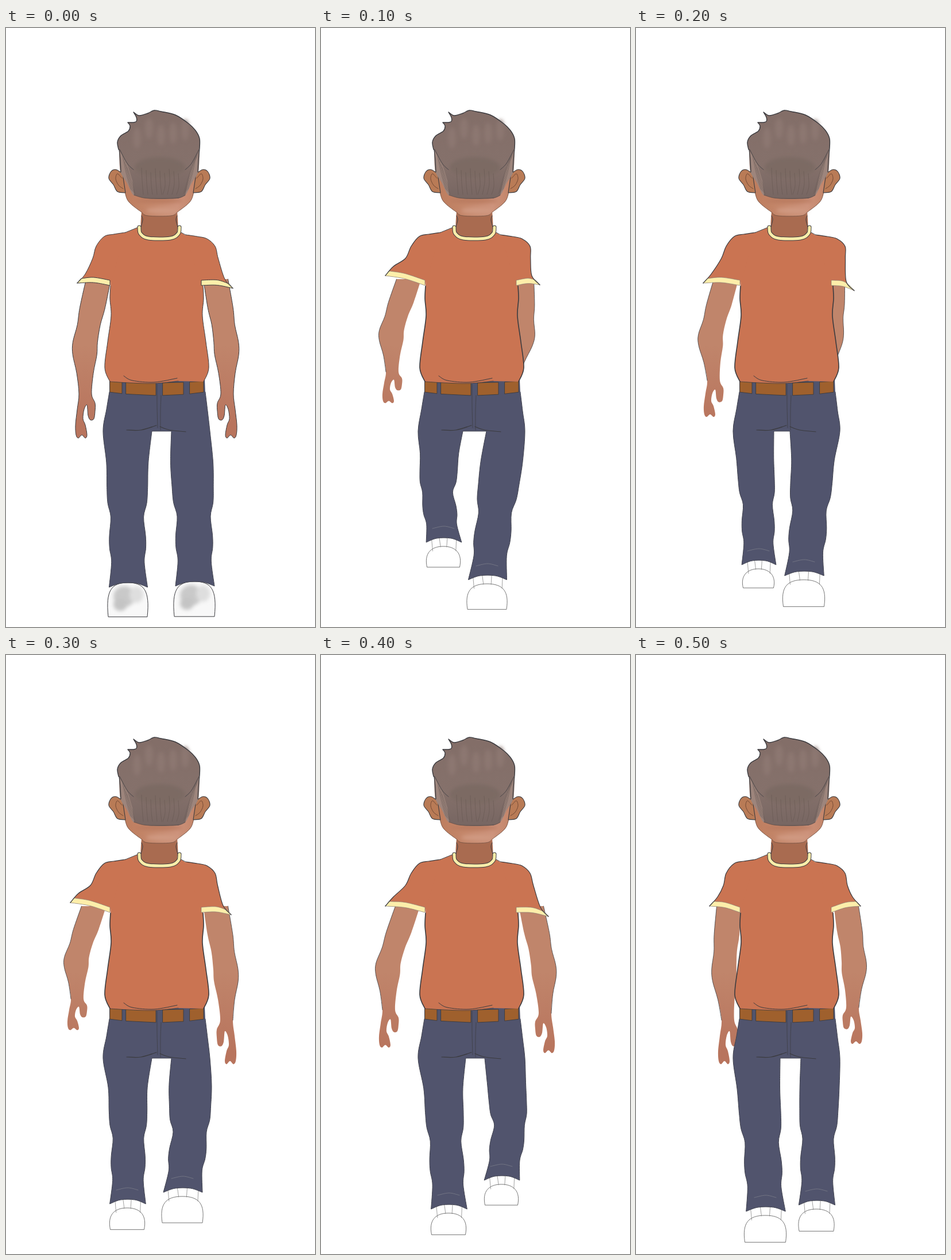
An HTML page for the animation above (0.6 s loop, 538 by 1040 pixels).

```html
<!DOCTYPE html>
<html lang="en">
<head>
<meta charset="utf-8">
<title>Walk cycle</title>
<style>
html, body { margin: 0; width: 100%; height: 100%; overflow: hidden; background: #fff; }
svg { display: block; width: 100vw; height: 100vh; }
path { stroke-linejoin: round; stroke-linecap: round; }
</style>
</head>
<body>
<svg viewBox="0 0 538 1040">
  <defs>
    <linearGradient id="skin" gradientUnits="userSpaceOnUse" x1="0" y1="550" x2="0" y2="690">
      <stop offset="0" stop-color="#c0856b"/><stop offset="1" stop-color="#b8745d"/>
    </linearGradient>
    <linearGradient id="hair" gradientUnits="userSpaceOnUse" x1="0" y1="150" x2="0" y2="296">
      <stop offset="0" stop-color="#836e68"/><stop offset=".6" stop-color="#85716b"/><stop offset="1" stop-color="#776662"/>
    </linearGradient>
    <linearGradient id="nape" gradientUnits="userSpaceOnUse" x1="205" y1="0" x2="330" y2="0">
      <stop offset="0" stop-color="#bd7d5e"/><stop offset=".4" stop-color="#c5886c"/><stop offset=".75" stop-color="#cd937c"/><stop offset="1" stop-color="#c28468"/>
    </linearGradient>
    <filter id="soft" x="-50%" y="-50%" width="200%" height="200%"><feGaussianBlur stdDeviation="3"/></filter>
  </defs>
  <g id="limbs"></g>
  <g id="body"></g>
  <g id="sleeves"></g>
  <g id="head"></g>
</svg>
<script>
const STEP = 100, CROTCH = 700, ARM_TOP = 436;
const INK = '#3b3b3f', SHIRT = '#ca7452', DENIM = '#51546d', TRIM = '#fdeeaa', BELT = '#9f602d';
const ARM_AXIS = 521, TORSO_AXIS = 525, HEAD_AXIS = 534;   // sums of mirrored x values

// Limb widths: [position along the limb, width].
const ARM_WIDTHS = [[0, 43], [.25, 44], [.4, 40], [.55, 43], [.66, 42], [.82, 29], [1, 22]];
const LEG_WIDTHS = [[.2, 74], [.36, 72], [.46, 69], [.55, 58], [.67, 64], [.75, 64], [.84, 58], [1, 68]];

// arm: sleeve tip x, y, shoulder x, elbow x, wrist x, y; the right arm is mirrored.
// leg: inner thigh x, knee x, ankle x, y, shoe width.
const poses = [
  { armL: [124, 443, 161, 137, 138, 635], armR: [126, 452, 156, 137, 136, 635],
    legL: [254, 211, 213, 971, 68], legR: [288, 327, 329, 969, 70] },
  { armL: [112, 430, 153, 122, 124, 597], armR: [140, 446, 172, 170, 190, 612],
    legL: [247, 203, 214, 893, 57], legR: [288, 303, 290, 958, 68] },
  { armL: [117, 443, 157, 129, 135, 612], armR: [141, 456, 179, 181, 190, 605],
    legL: [240, 212, 214, 932, 53], legR: [268, 302, 293, 951, 71] },
  { armL: [112, 430, 153, 122, 124, 597], armR: [129, 451, 156, 138, 137, 634],
    legL: [254, 213, 212, 953, 59], legR: [288, 320, 308, 933, 70] },
  { armL: [112, 436, 151, 116, 118, 616], armR: [125, 454, 155, 133, 131, 622],
    legL: [252, 217, 223, 962, 59], legR: [285, 328, 315, 912, 57] },
  { armL: [128, 436, 162, 153, 160, 634], armR: [130, 436, 155, 141, 144, 612],
    legL: [251, 219, 226, 966, 71], legR: [287, 317, 315, 955, 60] }
];

const get = id => document.getElementById(id);
const mix = (a, b, t) => a + (b - a) * t;
const mirror = (points, axis) => points.map(([x, y]) => [axis - x, y]);
const reversed = points => [...points].reverse();

function pts(text) {
  const n = text.split(' ').map(Number), p = [];
  for (let i = 0; i < n.length; i += 2) p.push([n[i], n[i + 1]]);
  return p;
}

// Smooth curve through each list of points, with corners between lists.
function curve(...parts) {
  return parts.map((p, k) => {
    let d = (k ? 'L' : 'M') + p[0];
    for (let i = 0; i < p.length - 1; i++) {
      const a = p[i - 1] || p[i], b = p[i], c = p[i + 1], e = p[i + 2] || c;
      const c1 = [b[0] + (c[0] - a[0]) / 6, b[1] + (c[1] - a[1]) / 6];
      const c2 = [c[0] - (e[0] - b[0]) / 6, c[1] - (e[1] - b[1]) / 6];
      d += `C${c1} ${c2} ${c}`;
    }
    return d;
  }).join('');
}
const path = (d, fill, width = 0, color = INK) =>
  `<path d="${d}" fill="${fill}" stroke="${width ? color : 'none'}" stroke-width="${width}"/>`;
const area = (parts, fill, width, color) => path(curve(...parts) + 'Z', fill, width, color);
const line = (points, width = 1, color = INK) => path(curve(points), 'none', width, color);
const blob = (x, y, rx, ry, fill) => `<ellipse cx="${x}" cy="${y}" rx="${rx}" ry="${ry}" fill="${fill}"/>`;
const soft = content => `<g filter="url(#soft)">${content}</g>`;

// Both edges of a limb bent at one joint.
function limb(x0, y0, joint, x1, y1, widths, bend, scale = 1) {
  const left = [], right = [];
  for (const [t, w] of widths) {
    const x = t < bend ? mix(x0, joint, t / bend) : mix(joint, x1, (t - bend) / (1 - bend));
    const y = mix(y0, y1, t), half = w * scale / 2;
    left.push([x - half, y]);
    right.push([x + half, y]);
  }
  return { left, right };
}

function arm([, , shoulder, elbow, x, y], flip, rest) {
  const { left, right } = limb(shoulder, ARM_TOP, elbow, x, y, ARM_WIDTHS, .57);
  const reach = (62 + (y - 610) * .6) / 71;   // a raised hand is foreshortened
  const hand = pts('-14 25 -17 50 -16 66 -12 71 -6 66 0 71 3 66 0 50 -4 40 -2 25 3 18 5 35 9 42 15 40 17 28 17 15')
    .map(([dx, dy]) => [x + dx, y + dy * reach]);
  const side = p => flip ? mirror(p, ARM_AXIS) : p;
  const outline = side([...left, ...hand, ...reversed(right)]);
  return area([outline], 'url(#skin)') + line(rest ? outline : side(left), rest ? 1 : .8);
}

function sleeve([x, y], flip, rest) {
  const drop = flip ? 4 : 0, inner = [181, 447];
  const middle = [mix(x, inner[0], .5), mix(y, inner[1], .5) - 3];
  const outer = [[208, 355 + drop], [188, 358 + drop], [171, 362 + drop], [157, 379],
    [110 + x * .33, 400], [x + 14, y - 16], [x, y]];
  const hem = [[x, y], middle, inner];
  const cuff = [[inner[0], inner[1] - 9], [middle[0], middle[1] - 9], [x + 7, y - 8]];
  const side = p => flip ? mirror(p, ARM_AXIS) : p;
  return area([side(outer), side(hem)], SHIRT) +
    area([side(hem), side(cuff)], TRIM, rest ? 1 : .6, rest ? INK : '#777') +
    line(side(outer), rest ? 1 : 1.2);
}

function leg([inner, knee, x, y, shoe], flip) {
  const hip = flip ? [inner, 355] : [169, inner];
  const edges = limb((hip[0] + hip[1]) / 2, CROTCH, knee, x, y, LEG_WIDTHS, .55, .5 + shoe / 140);
  edges.left.unshift([hip[0], CROTCH]);
  edges.right.unshift([hip[1], CROTCH]);
  const [a, b] = [edges.left.at(-1), edges.right.at(-1)];
  edges.hem = [a, [mix(a[0], b[0], .3), y - 7], [mix(a[0], b[0], .7), y - 7], b];
  return edges;
}

function pants(legL, legR) {
  const l = leg(legL, false), r = leg(legR, true);
  return area([[...pts('180 632 175 662'), ...l.left], l.hem, reversed(l.right),
    r.left, r.hem, [...reversed(r.right), ...pts('351 665 347 632')]], DENIM, 1, '#41434f');
}

function shoe([, , x, y, w], rest) {
  const x0 = x - 1 - w / 2, x1 = x0 + w, base = y + w * .75;
  const top = rest ? y - 8 : y + 7, mid = (x0 + x1) / 2;
  const shape = `M${x0} ${base}C${x0 - 5} ${top + 13} ${x0 + 6} ${top} ${mid} ${top}S${x1 + 5} ${top + 13} ${x1} ${base}Z`;
  if (rest) {
    return path(shape, '#f8f8f8') +
      soft(blob(mid - 6, y + 16, 19, 18, '#c9c9c9') + blob(mid + 15, y + 13, 12, 14, '#dedede') +
        blob(mid - 13, y + 30, 12, 11, '#c4c4c4')) + path(shape, 'none', 1);
  }
  const laces = [.14, .38, .62, .9].map(k =>
    `M${x0 + w * k} ${top - 14}l${k < .5 ? 2 : -1} ${k > .2 && k < .8 ? 15 : 22}`).join('');
  return path(shape, '#fff', .8, '#555') + path(laces, 'none', .7, '#777');
}

const hemMark = ([, , x, y]) => line([[x - 20, y - 24], [x, y - 28], [x + 18, y - 24]], .9, '#777986');

function drawPose({ armL, armR, legL, legR }, rest) {
  get('limbs').innerHTML = arm(armL, false, rest) + arm(armR, true, rest) +
    shoe(legL, rest) + shoe(legR, rest) + pants(legL, legR) +
    (rest ? '' : hemMark(legL) + hemMark(legR));
  get('sleeves').innerHTML = sleeve(armL, false, rest) + sleeve(armR, true, rest);
  get('sides').setAttribute('stroke-width', rest ? 1 : 1.6);
}

function drawBody() {
  const side = pts('182 448 181 470 183 500 177 545 172 590 181 614');
  const other = reversed(mirror(side, TORSO_AXIS));
  const bow = x => 6 * (1 - ((x - 263) / 83) ** 2);
  const belt = [[181, 202], [209, 261], [273, 309], [320, 344]].map(([a, b]) =>
    path(`M${a} ${613 + bow(a) / 2}L${b} ${613 + bow(b) / 2}V${632 + bow(b)}L${a} ${632 + bow(a)}Z`, BELT, .9));
  const left = pts('230 346 208 355 186 360'), right = pts('346 367 320 363 303 354');
  get('body').innerHTML = area([pts('180 612 346 610'), pts('347 634 180 634')], DENIM) + belt.join('') +
    line(pts('263 618 263 655 264 694'), .7) + line(pts('270 638 269 665 269 698'), .7) +
    line(pts('210 698 235 698 262 690'), 1.2) + line(pts('268 692 285 698 313 701'), 1.2) +
    area([left, side, pts('215 616 258 617 300 613'), other, right], SHIRT) +
    `<g id="sides" fill="none" stroke="${INK}"><path d="${curve(side)}"/><path d="${curve(other)}"/></g>` +
    line(pts('181 614 215 616 258 617 300 613'), .8) + line(pts('205 604 220 612 258 615 298 608')) +
    line(left.slice(0, 2)) + line(right.slice(1));
}

function drawHead() {
  const both = draw => draw(p => p) + draw(p => mirror(p, HEAD_AXIS));
  const round = half => [...half, ...reversed(mirror(half, HEAD_AXIS))];
  const collar = round(pts('232 346 234 357 248 365'));
  const scalp = pts('196 211 194 198 200 187 213 179 216 170 212 164');
  const crown = pts('222 164 227 162 227 155 222 146');
  const top = pts('222 146 232 152 247 148 258 143 270 145 295 151 318 166 330 178 337 192 337 210');

  let s = area([round(pts('236 318 235 348 244 361'))], '#a96b50') +
    both(m => line(m(pts('236 326 238 333 235 345')))) +
    line(collar, 7) + line(collar, 5, TRIM) +
    area([round(pts('198 215 200 255 207 285 214 302 235 319 247 326'))], 'url(#nape)', 1, '#7a5544') +
    soft(blob(266, 300, 42, 4, '#b97a5f') + blob(272, 317, 28, 5, '#d09a82'));

  s += both(m =>
    area([m(pts('208 286 194 284 187 272 179 261 183 249 192 246 203 253'))], '#b97b56', 1.1) +
    line(m(pts('204 279 196 273 191 262 194 253 202 261')), .9, '#6d4633') +
    area([m(pts('197 210 199 248 210 268 224 291 240 270 212 220'))], '#9d857c'));

  s += area([scalp, crown, top, pts('333 224 323 243 317 268 312 291'),
    pts('300 296 265 297 240 295 223 290'), pts('220 265 212 240 203 222')], 'url(#hair)');

  let locks = blob(268, 242, 44, 18, '#7c6a64');
  for (let i = 0; i < 5; i++) locks += blob(228 + i * 21, 182 + 9 * Math.cos(i * 2.6), 7, 18, '#8c7771');
  s += soft(locks);
  for (let i = 0; i < 9; i++) {
    const x = 236 + i * 8, y = 243 + i * 37 % 11;
    s += line([[x, y], [x + 1, y + 22], [x + (i < 5 ? 3 : -3), 289]], .5, '#62544f');
  }
  for (let i = 0; i < 5; i++) {
    const x = 203 + i * 2, y = 222 + i * 5;
    s += both(m => line(m([[x, y], [x + 6, 252 + i * 2], [x + 14, 280 + i * 2]]), .5, '#6a5d59'));
  }
  s += path(curve(scalp, crown, top), 'none', 1.4) +
    both(m => line(m(pts('197 211 199 230 200 250')), 1.2) + line(m(pts('198 211 211 235 222 246')), .8)) +
    line(pts('223 290 240 295 265 296 300 295 312 290'), .8, '#5b4c48');
  get('head').innerHTML = s;
}

let start, shown = -1;
function tick(now) {
  start ??= now;
  const i = Math.floor((now - start) / STEP) % poses.length;
  if (i !== shown) drawPose(poses[shown = i], i === 0);
  requestAnimationFrame(tick);
}
drawBody();
drawHead();
drawPose(poses[0], true);
requestAnimationFrame(tick);
</script>
</body>
</html>
```
